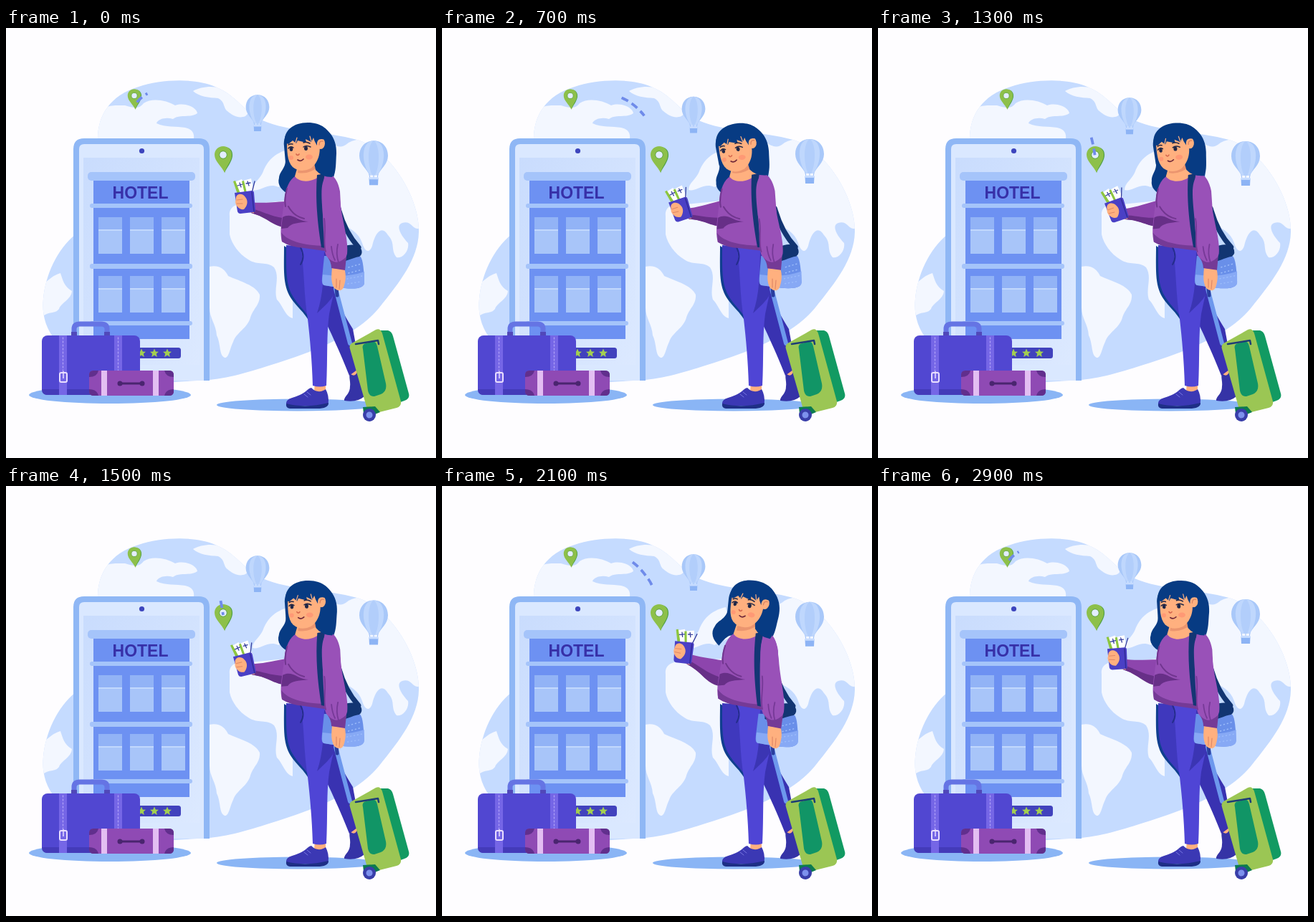
An HTML page for the animation above (3000 ms loop, 600 by 600 pixels).

```html
<!DOCTYPE html>
<html lang="en">
<head>
<meta charset="utf-8">
<title>Hotel trip</title>
<style>
html, body { margin: 0; width: 100%; height: 100%; overflow: hidden; background: #fefdff; }
svg { display: block; width: 100vw; height: 100vh; }
.land { fill: #f3f7ff; }
.line { fill: none; stroke-linecap: round; stroke-linejoin: round; }
</style>
</head>
<body>
<svg viewBox="0 0 600 600">
<defs>
  <clipPath id="globe"><path id="blob" d="M128 155C128 122 145 94 185 82C215 72 262 69 292 82C322 94 333 118 358 129C395 145 446 144 490 156C532 168 577 232 576 285C575 322 550 354 521 390C494 424 441 447 386 465C345 478 315 488 284 491L200 496L70 437C54 418 50 397 52 378C55 345 71 309 97 288Z"/></clipPath>
  <linearGradient id="screen" x2="1" y2="1"><stop stop-color="#c9dcfd"/><stop offset="1" stop-color="#dce9ff"/></linearGradient>
  <g id="window">
    <path fill="#92b3f6" d="M0 0h33v51H0z"/>
    <path fill="#a8c5f9" d="M0 17h33v34H0z"/>
    <path fill="#c2d8fd" d="M0 17h33v2H0z"/>
  </g>
  <g id="pin">
    <path fill="#4f9f45" d="M2 -11C9 -11 14 -6 13 2C12 10 5 18 2 25Z"/>
    <path fill="#8dc04a" d="M0 -12C7 -12 12 -7 12 0C12 9 4 16 2 25C-2 16 -12 9 -12 0C-12 -7 -7 -12 0 -12Z"/>
    <circle r="5.300" fill="#e3edff" stroke="#5fa244"/>
  </g>
  <g id="balloon">
    <path class="line" stroke="#9cbef7" d="M-6 24L-5 30M6 24L5 30M0 24V30"/>
    <path fill="#a9c8f9" d="M0 -23C13 -23 20 -13 20 -2C20 10 9 17 6 25H-6C-9 17 -20 10 -20 -2C-20 -13 -13 -23 0 -23Z"/>
    <path fill="#bfd7fd" d="M0 -23C-19 -22 -17 10 -5 25H5C17 10 19 -22 0 -23Z"/>
    <path fill="#b2cefb" d="M0 -23C-9 -18 -9 12 -2 25H2C9 12 9 -18 0 -23Z"/>
    <path fill="#8db4f5" d="M-6.500 29H6.500L6 39H-6Z"/>
    <path fill="#c7dcff" d="M-6.500 28H6.500V31H-6.500Z"/>
  </g>
  <path id="star" fill="#a3cf50" d="M0 -6L1.8 -2L6 -1.8L2.8 1.1L3.8 5.5L0 3.1L-3.8 5.5L-2.8 1.1L-6 -1.8L-1.8 -2Z"/>
</defs>

<!-- globe -->
<use href="#blob" fill="#c5dbff"/>
<g class="land" clip-path="url(#globe)">
  <path d="M124 124C135 106 150 108 166 108C179 112 186 113 192 105C204 97 224 101 236 108C250 103 266 111 267 119C257 126 242 120 233 127C223 124 212 127 210 133C223 139 238 137 250 139C260 141 263 147 262 154H124Z"/>
  <path d="M261 88C275 80 300 79 314 92C332 98 345 116 334 123C325 127 316 122 309 116C303 112 306 103 296 98C283 97 270 96 261 88Z"/>
  <path d="M284 333C297 330 306 337 310 346C328 354 348 359 354 372C355 386 345 391 341 404C337 419 321 425 317 438C312 448 311 461 305 460C297 456 300 441 294 429C293 413 284 405 284 390Z"/>
  <path d="M312 262C310 249 324 242 341 246L400 240V405C389 402 387 388 378 379C373 363 383 348 374 334C364 325 351 332 338 323C325 315 315 302 312 288Z"/>
  <path d="M344 226C344 216 355 211 359 200C364 187 374 174 396 169L405 210L380 222C366 215 354 229 344 226Z"/>
  <path d="M452 160C460 164 467 170 478 160C491 153 510 153 530 162C568 188 584 234 578 279C567 284 567 268 553 272C542 276 553 292 561 300C563 311 553 322 545 320C536 309 544 301 533 289C524 274 515 286 511 304C507 316 500 311 497 300C492 285 480 279 464 272Z"/>
  <path d="M48 360C60 352 65 345 76 342C79 351 81 361 92 367C91 379 77 383 74 392C68 400 59 394 50 404Z"/>
</g>
<g id="balloonA"><use href="#balloon" transform="translate(351 112) scale(.82)"/></g>
<g id="balloonB"><use href="#balloon" transform="translate(513 180)"/></g>

<!-- phone with hotel -->
<path fill="#dae8ff" stroke="#8fb7f5" stroke-width="8" d="M98 492V169Q98 158 109 158H269Q280 158 280 169V492"/>
<path fill="url(#screen)" d="M108 181H270V470H108Z"/>
<circle cx="189.500" cy="171.500" r="3.600" fill="#3d45bd"/>
<g fill="#6d91f2">
  <path d="M122 212H256V246H122Z"/><path d="M122 250H256V330H122Z"/>
  <path d="M122 335H256V409H122Z"/><path d="M122 414H256V434H122Z"/>
</g>
<g fill="#a5c4fa">
  <rect x="114" y="201" width="150" height="12" rx="5"/>
  <rect x="117" y="245" width="143" height="6" rx="3"/>
  <rect x="117" y="329" width="143" height="7" rx="3"/>
  <rect x="117" y="409" width="143" height="6" rx="3"/>
</g>
<g id="windows"></g>
<text x="187.500" y="237.500" text-anchor="middle" font-family="'Liberation Sans', Arial, sans-serif" font-weight="700" font-size="23" fill="#3730a8">HOTEL</text>
<rect x="140" y="446" width="104" height="15" rx="3.500" fill="#4142bd"/>
<use href="#star" x="189" y="453.500"/><use href="#star" x="207" y="453.500"/><use href="#star" x="225" y="453.500"/>

<!-- route -->
<use href="#pin" transform="translate(179 94.500) scale(.77)"/>
<use href="#pin" transform="translate(303 177)"/>
<path id="route" class="line" style="stroke-linecap:butt" stroke="#6f8bea" stroke-width="3.800" pathLength="180" d="M181 106C187 97 200 87 214 87C229 88 241 93 252 98C270 106 280 119 288 130C296 141 300 160 303 180"/>

<!-- bags -->
<ellipse cx="145" cy="512" rx="113" ry="12" fill="#8ab5f5"/>
<path class="line" stroke="#6574e4" stroke-width="7" d="M95 429V420Q95 413 103 413H133Q141 413 141 420V429"/>
<path fill="#5148b9" d="M91 424h8v7h-8zM137 424h8v7h-8z"/>
<rect x="50" y="429" width="137" height="83" rx="8" fill="#5147d1"/>
<path fill="#443bb9" d="M50 504H187Q187 512 179 512H58Q50 512 50 504Z"/>
<path fill="#7566e6" d="M74 429H85V512H74ZM151 429H162V512H151Z"/>
<path class="line" stroke="#ad9ff8" stroke-width="1.300" stroke-dasharray="2 3" d="M79.500 432V480M156.500 432V478"/>
<rect x="75" y="481" width="10" height="13" rx="2" fill="none" stroke="#eadfff" stroke-width="2"/>
<path stroke="#eadfff" stroke-width="1.500" d="M80 479V489"/>
<rect x="116" y="478" width="118" height="35" rx="6" fill="#8f4ab4"/>
<path fill="#612f8d" d="M122 478H129Q127 487 116 487V484Q116 478 122 478ZM228 478H221Q223 487 234 487V484Q234 478 228 478ZM116 504Q127 504 129 513H122Q116 513 116 507ZM234 504Q223 504 221 513H228Q234 513 234 507Z"/>
<path fill="#e3bef2" d="M133 478H141V513H133ZM205 478H213V513H205Z"/>
<path class="line" stroke="#4a256f" stroke-width="3" d="M160 496H189"/>
<circle cx="159" cy="496" r="3.500" fill="#4a256f"/><circle cx="190" cy="496" r="3.500" fill="#4a256f"/>

<!-- legs -->
<ellipse cx="407" cy="526" rx="113" ry="8.500" fill="#8ab5f5"/>
<path fill="#ffb07f" d="M478 474L490 471L492 489L481 493Z"/>
<path fill="#3533a6" d="M472 518C474 512 480 510 480 500C481 493 478 487 480 482Q487 489 491 478L500 514Q490 523 472 520Z"/>
<path fill="#3932b1" d="M432 366L459 368C462 384 472 400 484 420L494 474L479 485C466 452 452 422 440 398Z"/>
<path fill="#103f8f" d="M388 304C388 337 386 358 397 376C405 389 415 394 426 414L430 330Z"/>
<path fill="#3f38bd" d="M391 303C391 337 390 357 400 374C408 388 418 393 427 412L440 330L430 306Z"/>
<path fill="#ffb07f" d="M431 494H446L446 511Q438 516 430 507Z"/>
<path fill="#4f45d5" d="M411 305L464 311C466 338 457 370 451 399C447 428 449 460 447 499Q438 502 428 499C427 463 424 433 421 406C415 371 417 340 411 305Z"/>
<path fill="#3b35b3" d="M444 313C443 346 443 372 434 398C443 389 454 380 457 372C461 353 466 336 464 313Z"/>
<path class="line" stroke="#252d8d" stroke-width="2" d="M411 306C416 316 415 324 411 330"/>
<path fill="#3b38b4" d="M391 523C392 516 402 516 410 512C419 508 421 503 426 502C432 509 441 508 446 504Q452 515 449 527L391 527Z"/>
<path fill="#1e2f86" d="M391 524Q418 531 450 523Q450 531 434 531H396Q390 530 391 524Z"/>
<path class="line" stroke="#7977e2" stroke-width="1" d="M416 511L421 515M420 508L425 512"/>

<!-- trolley -->
<path class="line" stroke="#6d98ed" stroke-width="6" d="M460 364L480 440"/>
<path class="line" stroke="#293e9f" stroke-width="5" d="M460 350L462 373"/>
<path fill="#129a62" d="M518 422L533 422Q538 423 540 430L562 510Q564 517 556 520L545 524Z"/>
<path fill="#9bc654" d="M484 439L516 421Q522 418 525 426L551 521Q552 528 545 530L513 538Q506 539 504 532L480 448Q478 442 484 439Z"/>
<path fill="#119566" d="M498 448Q496 441 503 440L510 438Q516 436 518 444L530 496Q532 507 523 511L514 514Q507 515 505 506Z"/>
<path class="line" stroke="#1d3d76" stroke-width="2.500" d="M488 441L519 436L520 441"/>
<path fill="#0c7b50" d="M498 529L515 528L522 536L510 541L499 538Z"/>
<circle cx="507" cy="540" r="9" fill="#393ea9"/><circle cx="507" cy="540" r="4.500" fill="#7d91ed"/>

<!-- traveller -->
<g id="hairBack">
  <path id="strand" fill="#073b83" d="M390 182C391 196 382 199 381 209C378 219 385 228 396 232C400 220 403 211 412 212L416 186Z"/>
  <path fill="#073b83" d="M388 165C386 145 402 132 423 133C448 134 462 153 461 175C460 190 461 198 456 211L412 212L390 188Z"/>
</g>
<g id="arm">
  <path fill="#8d45ad" d="M342 243C356 245 370 243 391 242L402 272C392 282 376 275 364 267Q354 261 342 258Z"/>
  <path fill="#672f87" d="M342 252C361 256 370 265 402 267L399 276C386 282 373 273 363 267Q353 261 342 258Z"/>
  <path fill="#ffb07f" d="M330 241L347 243L346 258L331 256Z"/>
  <path fill="#fff" d="M319 215L329 211L337 231L324 234ZM331 213L342 210L346 230L332 231Z"/>
  <path fill="#8dc63f" d="M317 214L320 213L327 231L323 232ZM329 214L332 213L336 230L333 231Z"/>
  <path class="line" stroke="#343c9d" stroke-width="1.300" d="M323 220L330 218M326 216L328 222M335 217L341 216M337 214L339 220M347 214L343 230"/>
  <path fill="#4a40c5" d="M319 230L343 227Q346 227 346 230L348 254Q348 257 345 257L327 259Q324 259 323 256Z"/>
  <path class="line" stroke="#302c99" stroke-width="1.500" d="M343 229L346 256"/>
  <path fill="#ffb07f" d="M321 236C323 230 331 231 334 236C339 242 336 249 332 253C326 254 321 249 320 243Z"/>
  <path class="line" stroke="#df8967" stroke-width="1" d="M322 240L330 239M322 245L330 245"/>
</g>
<g id="bag">
  <path class="line" stroke="#123572" stroke-width="7" d="M464 252C470 275 481 294 492 306"/>
  <path fill="#698fe9" d="M444 318H493Q499 319 500 355Q500 361 491 363C476 365 459 361 444 359Q440 358 441 349Z"/>
  <path fill="#87a9f5" d="M442 344Q475 349 500 340L500 356Q500 361 491 363C476 365 459 361 444 359Q440 358 442 344Z"/>
  <path fill="#123572" d="M453 317C469 301 488 299 495 307Q499 315 493 319C480 321 468 331 453 325Z"/>
  <path class="line" stroke="#9bbbfa" stroke-width="1.500" stroke-dasharray="1 4" d="M478 334L496 329M478 342L497 337M476 350L497 346M477 357L495 354"/>
</g>
<g id="torso">
  <path fill="#964fb5" d="M405 206C395 211 390 224 388 242C386 262 381 282 385 298Q398 306 416 305L458 312L470 302L466 228Q462 207 450 203L437 201Q422 217 405 206Z"/>
  <path fill="#753a96" d="M384 285C394 300 425 305 458 304V313L416 307Q397 306 385 298Z"/>
  <path fill="#672f87" d="M386 264C393 260 400 262 407 266Q415 270 422 270C407 272 398 272 393 279L384 280Z"/>
  <path class="line" stroke="#71358f" stroke-width="2" d="M394 249C400 260 407 264 416 266M392 224Q388 238 390 249"/>
  <path fill="#ffb07f" d="M407 193L439 184L442 201C434 215 411 218 403 207Z"/>
  <path fill="#eb956f" d="M408 196Q428 195 437 186L438 192Q423 205 407 202Z"/>
  <path fill="#143674" d="M434 205L445 203C440 225 441 265 445 307L440 306C436 280 431 245 434 205Z"/>
</g>
<path fill="#ffb07f" d="M455 335H472C475 345 474 353 471 362C468 368 463 367 458 363C453 355 454 345 455 335Z"/>
<path class="line" stroke="#df8967" stroke-width="1.200" d="M461 350V362M466 352L465 364"/>
<g id="sleeve">
  <path fill="#9951b8" d="M448 205C459 206 463 219 466 240C469 271 478 293 476 315Q473 323 473 337L455 335Q454 325 447 318C441 306 446 280 442 260C440 235 438 214 448 205Z"/>
  <path fill="#743a96" d="M449 320C458 330 466 328 475 319L473 338L454 335Q454 327 449 320Z"/>
  <path class="line" stroke="#763997" stroke-width="1.800" d="M444 266C447 283 442 298 446 312M463 302Q460 315 464 327M454 305Q455 316 459 324"/>
</g>
<g id="head">
  <path fill="#073b83" d="M420 140C450 141 461 159 460 176C459 190 460 198 455 208Q440 208 432 198Z"/>
  <path fill="#ffb07f" d="M392 154L435 151C441 171 437 187 425 196Q411 203 400 194C392 186 392 171 392 154Z"/>
  <ellipse cx="439" cy="161" rx="6" ry="8" fill="#ffb07f"/>
  <path class="line" stroke="#db8362" stroke-width="1.300" d="M437 163Q437 157 442 158"/>
  <path fill="#073b83" d="M389 160C387 143 401 132 421 132C440 132 453 142 454 157L440 155Q433 155 434 164Q430 158 429 153L426 159L418 155L419 160L407 157L405 161L400 157L394 162Z"/>
  <path class="line" stroke="#ffb07f" stroke-width="1.200" d="M404 160L406 153M426 158L424 151"/>
  <g fill="#ff8e70" opacity=".65"><ellipse cx="423" cy="180" rx="5" ry="3.500"/><ellipse cx="398" cy="181" rx="3" ry="3"/></g>
  <g fill="#202747"><ellipse cx="398" cy="169" rx="2.300" ry="2.900"/><ellipse cx="418.500" cy="168" rx="2.500" ry="3"/></g>
  <path class="line" stroke="#202747" stroke-width="1.500" d="M394 168Q397 164 401 167M415 166Q419 163 425 166M394 163Q397 161 400 162M415 160Q419 158 424 161"/>
  <path class="line" stroke="#d6694f" stroke-width="1.700" d="M405 176Q407 179 409 176"/>
  <path class="line" stroke="#6f2738" stroke-width="1.700" d="M407 184Q411 187 415 183"/>
</g>
</svg>
<script>
const LOOP = 3000, STEP = 100, DASH = 10, GAP = 6;
const times = [0, 400, 1100, 1500, 2100, 2500, 2900];
const keys = {
  head: [0, -2.5, -5.5, .8, 8.6, 5.5, 1],
  arm: [0, -7, -15, -7, 12.5, 11.5, 2.5],
  tail: [3, 38, 130, 160, 95, 34, 3],
  tip: [22, 80, 162, 181, 137, 79, 21]
};
const $ = id => document.getElementById(id);
const wave = (t, shift) => Math.cos((t + shift) * 2 * Math.PI / LOOP);
const turn = (id, angle, x, y) => $(id).setAttribute('transform', `rotate(${angle} ${x} ${y})`);
const shift = (id, y) => $(id).setAttribute('transform', `translate(0 ${y})`);

$('windows').innerHTML = [264, 346].map(y =>
  [129, 173, 217].map(x => `<use href="#window" x="${x}" y="${y}"/>`).join('')).join('');

// Smooth periodic curve through the keys.
function curve(values, t) {
  const n = times.length;
  const at = i => {
    const k = (i + n) % n;
    return [times[k] + LOOP * Math.floor(i / n), values[k]];
  };
  const slope = i => {
    const [t0, a] = at(i - 1), [t1, b] = at(i + 1);
    return (b - a) / (t1 - t0);
  };
  let i = n - 1;
  while (times[i] > t) i--;
  const [t0, a] = at(i), [t1, b] = at(i + 1);
  const d = t1 - t0, u = (t - t0) / d, v = 1 - u;
  return a * v * v * (1 + 2 * u) + b * u * u * (3 - 2 * u)
    + d * u * v * (v * slope(i) - u * slope(i + 1));
}

function drawRoute(from, to) {
  from = Math.max(0, from);
  const parts = [0, from];
  for (let p = from; p < to; p += DASH + GAP) parts.push(Math.min(DASH, to - p), GAP);
  parts[parts.length - 1] = 999;
  $('route').setAttribute('stroke-dasharray', parts.join(' '));
}

function draw(t) {
  const head = curve(keys.head, t), lean = head * .25;
  const neck = `rotate(${lean} 425 305) rotate(${head} 427 205)`;
  $('head').setAttribute('transform', neck);
  $('hairBack').setAttribute('transform', neck);
  turn('strand', head * 1.2, 400, 180);
  turn('torso', lean, 425, 305);
  turn('sleeve', lean, 463, 340);
  turn('bag', lean * .6, 450, 210);
  turn('arm', curve(keys.arm, t), 385, 251);
  shift('balloonA', 2.1 - 2.1 * wave(t, 150));
  shift('balloonB', 1.3 - 3.5 * wave(t, -600));
  drawRoute(curve(keys.tail, t), curve(keys.tip, t));
}

const start = performance.now();
function tick() {
  const t = (performance.now() - start) % LOOP;
  draw(Math.floor(t / STEP) * STEP);
  requestAnimationFrame(tick);
}
tick();
</script>
</body>
</html>
```
